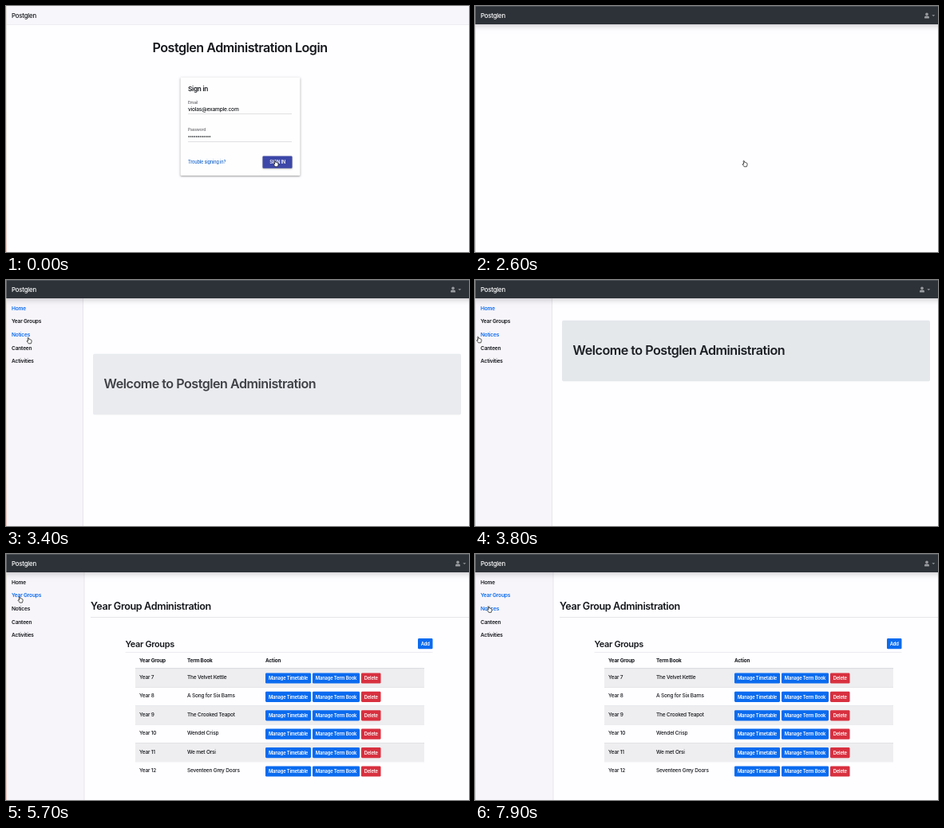
These frames come from a looping animation (580x309 px, 8 s). An HTML page with a canvas:

```html
<!DOCTYPE html>
<html lang="en">
<head>
<meta charset="utf-8">
<title>Administration walkthrough</title>
<style>
html, body { margin: 0; width: 100%; height: 100%; overflow: hidden; background: #fefdff; }
canvas { display: block; width: 580px; height: 309px; }
</style>
</head>
<body>
<canvas id="stage"></canvas>
<script>
const W = 580, H = 309, LOOP = 8000, STEP = 100;
const APP = 'Postglen';
const FONT = 'Inter, "Open Sans", sans-serif';
const INK = '#14171b', BLUE = '#0b6bef', RED = '#d8303f', PAPER = '#fefdff';
const LINE = '#dcdde1', NAV_H = 23;

// Moments of change, in ms
const NAV_AT = 2300, HOME_AT = 2700, SLIDE_AT = 2650, SLIDE_MS = 1500;
const WIDE_AT = 4200, YEARS_AT = 5200, ROWS_AT = 5400;

const MENU = ['Home', 'Year Groups', 'Notices', 'Canteen', 'Activities'];
const MENU_TOP = 27, MENU_PITCH = 16.7;
const BOOKS = ['The Velvet Kettle', 'A Song for Six Barns', 'The Crooked Teapot',
  'Wendel Crisp', 'We met Orsi', 'Seventeen Grey Doors'];

// Pointer path: time, x, y
const PATH = [[0, 338, 198], [2700, 338, 198], [3300, 29, 76], [3500, 29, 76], [3800, 5, 75],
  [4100, 5, 75], [4500, 18, 58], [6400, 18, 57], [7300, 18, 57], [7700, 18, 69.5]];

const canvas = document.getElementById('stage');
const ctx = canvas.getContext('2d');
const dpr = window.devicePixelRatio || 1;
canvas.width = Math.round(W * dpr);
canvas.height = Math.round(H * dpr);

function rect(x, y, w, h, color, r = 0) {
  ctx.fillStyle = color;
  ctx.beginPath();
  ctx.roundRect(x, y, w, h, r);
  ctx.fill();
}

// Text placed by the middle of its capitals
function text(str, x, cy, size, color = INK, weight = 500, align = 'left') {
  ctx.font = `${weight} ${size}px ${FONT}`;
  ctx.letterSpacing = `${-0.03 * size}px`;
  ctx.textAlign = align;
  ctx.fillStyle = color;
  ctx.fillText(str, x, cy + size * 0.363);
}

function shadedRect(x, y, w, h, color, r, tone, blur, dy) {
  ctx.save();
  ctx.shadowColor = tone;
  ctx.shadowBlur = blur * dpr;
  ctx.shadowOffsetY = dy * dpr;
  rect(x, y, w, h, color, r);
  ctx.restore();
}

function button(label, x, cy, w, color) {
  rect(x, cy - 6.6, w, 13.2, color, 1.4);
  text(label, x + w / 2, cy, 5.8, '#fff', 600, 'center');
}

function bezier(a, b, u) {
  return 3 * (1 - u) ** 2 * u * a + 3 * (1 - u) * u * u * b + u ** 3;
}

// The CSS "ease" curve
function ease(p) {
  if (p <= 0 || p >= 1) return p <= 0 ? 0 : 1;
  let lo = 0, hi = 1;
  for (let i = 0; i < 24; i++) {
    const mid = (lo + hi) / 2;
    if (bezier(0.25, 0.25, mid) < p) lo = mid; else hi = mid;
  }
  return bezier(0.1, 1, lo);
}

function pointer(t) {
  const next = PATH.findIndex(k => k[0] > t);
  if (next < 0) return PATH[PATH.length - 1].slice(1);
  const [t0, x0, y0] = PATH[next - 1], [t1, x1, y1] = PATH[next];
  const p = (t - t0) / (t1 - t0), s = p * p * (3 - 2 * p);
  return [x0 + (x1 - x0) * s, y0 + (y1 - y0) * s];
}

function drawHand(x, y) {
  ctx.save();
  ctx.translate(x, y);
  ctx.beginPath();
  ctx.moveTo(-1.9, -3.3);
  ctx.quadraticCurveTo(-1.3, -4.3, -0.6, -3.2);
  ctx.lineTo(-0.2, -1.4);
  ctx.quadraticCurveTo(0.6, -2, 1.1, -1.2);
  ctx.quadraticCurveTo(2, -1.6, 2.3, -0.7);
  ctx.quadraticCurveTo(3.2, -0.8, 3.1, 0.4);
  ctx.quadraticCurveTo(3.1, 2.2, 2.3, 3.8);
  ctx.lineTo(-0.8, 3.8);
  ctx.quadraticCurveTo(-1.6, 2.4, -3, 0.9);
  ctx.quadraticCurveTo(-2.9, -0.1, -1.3, 0.7);
  ctx.closePath();
  ctx.fillStyle = '#fff';
  ctx.strokeStyle = '#222';
  ctx.lineWidth = 0.8;
  ctx.lineJoin = 'round';
  ctx.fill();
  ctx.stroke();
  ctx.restore();
}

function drawField(label, y) {
  text(label, 228, y, 5, '#66666d');
  rect(228, y + 14.6, 130, 0.8, '#d6d6da');
}

function drawLogin() {
  rect(0, 0, W, NAV_H, '#f7f6fa');
  rect(0, NAV_H, W, 0.8, '#e9e8ec');
  text(APP, 7, 12, 7.9);
  text(APP + ' Administration Login', 293, 52.3, 16.1, INK, 600, 'center');

  shadedRect(218.5, 89.5, 150, 123.5, '#fefefe', 1.2, 'rgba(0,0,0,.4)', 2.5, 0.9);
  text('Sign in', 228, 104.2, 8.2, INK, 600);
  drawField('Email', 120.7);
  text('violas@example.com', 228, 129.3, 6.6);
  drawField('Password', 155.3);
  ctx.fillStyle = INK;
  for (let i = 0; i < 12; i++) {
    ctx.beginPath();
    ctx.arc(229.2 + i * 2.38, 164, 0.85, 0, 7);
    ctx.fill();
  }
  text('Trouble signing in?', 228, 196.2, 5.6, '#1a66cc');
  shadedRect(321.5, 188.5, 37, 15.3, '#3c47a8', 1, 'rgba(0,0,0,.35)', 2, 0.8);
  text('SIGN IN', 340.2, 196.2, 5.6, '#fff', 600, 'center');
}

function drawNav(right) {
  shadedRect(-10, -10, W + 20, NAV_H + 10, '#2d3238', 0, 'rgba(0,0,0,.2)', 7, 2);
  rect(0, 0, W, 0.7, '#565b60');
  text(APP, 7, 12, 7.9, '#fff');

  ctx.fillStyle = '#9a9da1';
  ctx.beginPath();
  ctx.arc(right - 14, 10.2, 1.8, 0, 7);
  ctx.fill();
  rect(right - 17, 12.4, 6, 3, '#9a9da1', [1.8, 1.8, 0.4, 0.4]);
  ctx.beginPath();
  ctx.moveTo(right - 7.6, 11.2);
  ctx.lineTo(right - 3.8, 11.2);
  ctx.lineTo(right - 5.7, 13.1);
  ctx.fill();
}

function drawSidebar(width, active, hover) {
  rect(0, NAV_H, width, H - NAV_H, '#f7f5fa');
  rect(width - 0.4, NAV_H, 0.8, H - NAV_H, '#e3e2e7');
  MENU.forEach((name, i) => {
    const color = i === active || i === hover ? BLUE : INK;
    text(name, 7, MENU_TOP + 8.2 + i * MENU_PITCH, 6.6, color, 600);
  });
}

function drawWelcome(t, wide) {
  const p = ease((t - SLIDE_AT) / SLIDE_MS);
  const x = wide ? 112 : 109, y = 42 + (1 - p) * 257;
  ctx.save();
  ctx.globalAlpha = p;
  rect(x, y, wide ? 462 : 461, 76.5, '#e4e8eb', 2);
  text('Welcome to ' + APP + ' Administration', x + 13.6, y + 37.2, 16.1, INK, 600);
  ctx.restore();
}

function drawRow(book, i) {
  const top = 143.7 + i * 23.4, cy = top + 10.9;
  rect(162, top, 362, 23.4, i % 2 ? PAPER : '#eeedef');
  rect(162, top, 362, 0.6, LINE);
  text('Year ' + (7 + i), 167, cy, 6.5);
  text(book, 227, cy, 6.5);
  button('Manage Timetable', 325, cy + 1.4, 57, BLUE);
  button('Manage Term Book', 384, cy + 1.4, 59, BLUE);
  button('Delete', 445, cy + 1.4, 24.5, RED);
}

function drawYears(t) {
  text('Year Group Administration', 106, 65.2, 12.6, INK, 600);
  rect(106, 79, W - 106, 0.7, LINE);
  text('Year Groups', 149.5, 113.4, 10.9, INK, 600);
  button('Add', 516, 112.7, 18.5, BLUE);
  rect(149.5, 123.3, 385, 0.6, '#e6e6ea');
  text('Year Group', 167, 133.6, 6.4, INK, 700);
  text('Term Book', 227, 133.6, 6.4, INK, 700);
  text('Action', 325, 133.6, 6.4, INK, 700);
  if (t >= ROWS_AT) BOOKS.forEach(drawRow);
  rect(162, 143.2, 362, 0.9, '#d5d7db');
}

function drawEdge(inApp) {
  const tint = ctx.createLinearGradient(0, NAV_H, 0, H);
  tint.addColorStop(0, '#dedbd2');
  tint.addColorStop(0.75, '#e6d6c8');
  tint.addColorStop(1, '#efb9a8');
  rect(0, 0, 0.8, H, tint);
  if (inApp) rect(0, 0, 0.8, NAV_H, '#565b60');
}

function draw(t) {
  ctx.setTransform(dpr, 0, 0, dpr, 0, 0);
  rect(0, 0, W, H, PAPER);
  const [x, y] = pointer(t);
  const inApp = t >= NAV_AT;
  if (!inApp) {
    drawLogin();
  } else {
    const wide = t < HOME_AT || t >= WIDE_AT;
    const onYears = t >= YEARS_AT;
    if (t >= HOME_AT) {
      const hover = x < 97 ? Math.floor((y - 4 - MENU_TOP) / MENU_PITCH) : -1;
      drawSidebar(wide ? 98 : 96.5, onYears ? 1 : 0, hover);
      if (onYears) drawYears(t); else drawWelcome(t, wide);
    }
    drawNav(wide ? W : W - 6);
  }
  drawEdge(inApp);
  drawHand(x, y);
}

const start = performance.now();
function tick() {
  const t = (performance.now() - start) % LOOP;
  draw(Math.floor(t / STEP) * STEP);
  requestAnimationFrame(tick);
}
tick();
</script>
</body>
</html>
```
